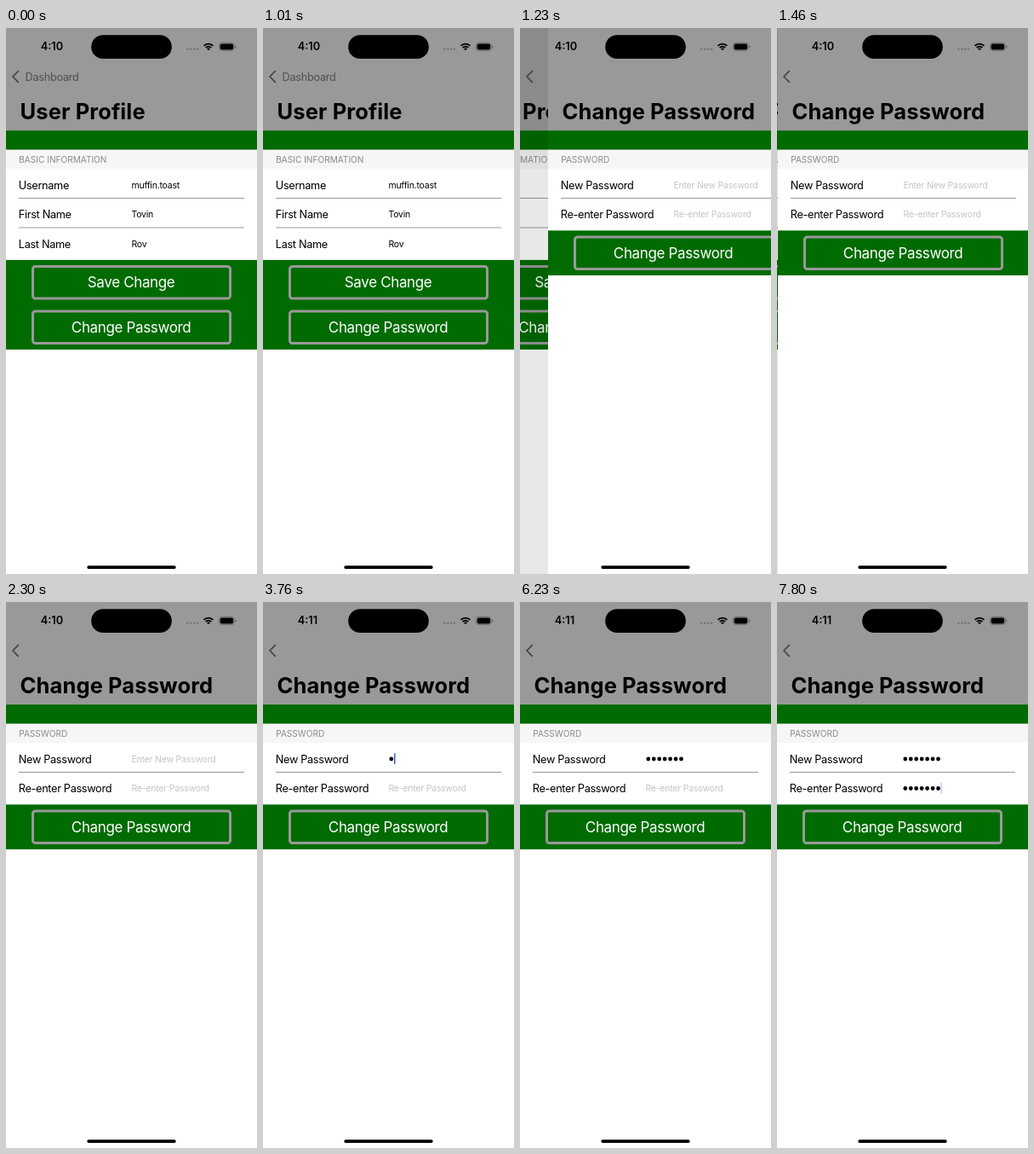
These frames come from a looping animation (295 px wide and 640 px high, 8 s). An HTML page with a canvas:

```html
<!DOCTYPE html>
<html lang="en">
<head>
<meta charset="utf-8">
<title>Change password flow</title>
<style>
  html, body { margin: 0; width: 100%; height: 100%; overflow: hidden; background: #fff; }
  canvas { display: block; width: 295px; height: 640px; }
</style>
</head>
<body>
<canvas id="stage"></canvas>
<script>
const W = 295, H = 640, LOOP = 8000;
const GREEN = '#006b00', GRAY = '#999', CARET = '#3455c8';
const canvas = document.getElementById('stage');
const ctx = canvas.getContext('2d');
const scale = window.devicePixelRatio || 1;
canvas.width = W * scale;
canvas.height = H * scale;

// Each entry: [start ms, number of dots, caret opacity]
const newPassword = [
  [2530, 0, 1], [2950, 0, 0], [3350, 0, 1],
  [3760, 1, 1], [3880, 3, 1], [4010, 4, 1], [4130, 6, 1], [4300, 7, 1],
  [4800, 7, .9], [4920, 7, .3], [5160, 7, 0]
];
const repeatPassword = [
  [5770, 0, .4], [5910, 0, 1], [6230, 0, 0],
  [6670, 1, 1], [6790, 3, 1], [7010, 5, 1], [7170, 7, 1],
  [7680, 7, .9], [7800, 7, .3]
];
const slideTimes = [1010, 1120, 1230, 1340, 1460];

const fieldAt = (steps, t) => steps.findLast(s => s[0] <= t) || [0, 0, 0];

// Critically damped spring, sampled at the slide steps
function slideProgress(t) {
  if (t >= 2300) return 1;
  const at = slideTimes.findLast(s => s <= t);
  if (!at) return 0;
  const x = 17 * (at - 1009) / 1000;
  return 1 - (1 + x) * Math.exp(-x);
}

function rect(x, y, w, h, color) {
  ctx.fillStyle = color;
  ctx.fillRect(x, y, w, h);
}

function pill(x, y, w, h, r, color) {
  ctx.fillStyle = color;
  ctx.beginPath();
  ctx.roundRect(x, y, w, h, r);
  ctx.fill();
}

function dot(x, y, r, color) {
  ctx.fillStyle = color;
  ctx.beginPath();
  ctx.arc(x, y, r, 0, 7);
  ctx.fill();
}

function text(str, x, y, size, { color = '#000', weight = 400, spacing = 0, align = 'left' } = {}) {
  ctx.font = `${weight} ${size}px Inter, Roboto, sans-serif`;
  ctx.letterSpacing = `${spacing * size}px`;
  ctx.textAlign = align;
  ctx.fillStyle = color;
  ctx.fillText(str, x, y);
}

function pageTop(title, section) {
  rect(0, 0, W, H, '#fff');
  rect(0, 0, W, 165, '#f6f6f6');
  rect(0, 0, W, 142.6, GREEN);
  rect(0, 0, W, 120.2, GRAY);
  text(title, 16.6, 106.9, 25.5, { weight: 700, spacing: .004 });
  text(section, 15.2, 157.6, 10.1, { color: '#8a8a8d' });
}

const rowY = i => 184 + 34.5 * i;

function label(str, i) {
  text(str, 14.8, rowY(i) + 4.8, 12.76, { spacing: -.027 });
}

function value(str, i, color) {
  text(str, 147.4, rowY(i) + 3.7, 10.5, { color, spacing: -.02 });
}

function separator(i) {
  rect(15, 199 + 34.5 * i, 265, 1, '#999');
}

function button(str, y, alpha = 1) {
  ctx.strokeStyle = GRAY;
  ctx.lineWidth = 3;
  ctx.beginPath();
  ctx.roundRect(31.5, y + 1.5, 232, 37.5, 3);
  ctx.stroke();
  ctx.globalAlpha = alpha;
  text(str, 147.1, y + 26.2, 17, { color: '#fff', spacing: -.021, align: 'center' });
  ctx.globalAlpha = 1;
}

function profilePage(pressed) {
  pageTop('User Profile', 'BASIC INFORMATION');
  [['Username', 'muffin.toast'], ['First Name', 'Tovin'], ['Last Name', 'Rov']].forEach(([name, val], i) => {
    label(name, i);
    value(val, i, '#000');
    if (i < 2) separator(i);
  });
  rect(0, 271.9, W, 105, GREEN);
  button('Save Change', 278);
  button('Change Password', 330.5, pressed ? .8 : 1);
}

function secureField(i, placeholder, [, count, caret]) {
  const y = rowY(i);
  if (!count) value(placeholder, i, '#c5c5c7');
  for (let n = 0; n < count; n++) dot(150.8 + 6.45 * n, y, 2.4, '#000');
  ctx.globalAlpha = caret;
  rect(147.6 + 6.4 * count, y - 6.7, 1.5, 12.7, CARET);
  ctx.globalAlpha = 1;
}

function passwordPage(t) {
  pageTop('Change Password', 'PASSWORD');
  label('New Password', 0);
  label('Re-enter Password', 1);
  separator(0);
  secureField(0, 'Enter New Password', fieldAt(newPassword, t));
  secureField(1, 'Re-enter Password', fieldAt(repeatPassword, t));
  rect(0, 237.4, W, 52.5, GREEN);
  button('Change Password', 243.5);
}

function backButton(p) {
  ctx.save();
  ctx.beginPath();
  ctx.rect(p ? 11 : 0, 40, W, 40);
  ctx.clip();
  ctx.globalAlpha = Math.max(0, 1 - 1.15 * p);
  text('Dashboard', 22.6 - 78 * p, 61.5, 12.76, { color: '#505050', spacing: -.024 });
  ctx.restore();
  ctx.strokeStyle = '#444';
  ctx.lineWidth = 1.7;
  ctx.lineCap = ctx.lineJoin = 'round';
  ctx.beginPath();
  ctx.moveTo(14.3, 50.7);
  ctx.lineTo(8, 57);
  ctx.lineTo(14.3, 63.3);
  ctx.stroke();
}

function wifi(x, y) {
  const from = -Math.PI * .75, to = -Math.PI * .25;
  ctx.strokeStyle = '#000';
  ctx.lineWidth = 1.9;
  ctx.lineCap = 'butt';
  for (const r of [4.6, 7.7]) {
    ctx.beginPath();
    ctx.arc(x, y, r, from, to);
    ctx.stroke();
  }
  ctx.fillStyle = '#000';
  ctx.beginPath();
  ctx.moveTo(x, y);
  ctx.arc(x, y, 2.7, from, to);
  ctx.fill();
}

function systemChrome(t) {
  text(t < 2530 ? '4:10' : '4:11', 40.8, 26.4, 12.76, { weight: 600 });
  pill(100.2, 8.3, 94.6, 27.8, 13.9, '#000');
  for (let i = 0; i < 4; i++) dot(213.2 + 4 * i, 24.7, 1.3, '#767676');
  wifi(238, 26.3);
  ctx.strokeStyle = '#666';
  ctx.lineWidth = .8;
  ctx.beginPath();
  ctx.roundRect(250.4, 17.4, 18, 9.2, 3);
  ctx.stroke();
  pill(251.6, 18.6, 15.6, 6.8, 1.8, '#000');
  pill(269.3, 20.5, 1.2, 3, .6, '#666');
  pill(95.3, 630.2, 104.4, 3.75, 1.9, '#000');
}

function draw(t) {
  const p = slideProgress(t);
  ctx.setTransform(scale, 0, 0, scale, 0, 0);

  if (p < 1) {
    ctx.save();
    ctx.translate(-.3 * W * p, 0);
    profilePage(t >= 860 && t < 1010);
    ctx.restore();
    rect(0, 0, W, H, `rgba(0,0,0,${.1 * p})`);
  }
  if (p > 0) {
    ctx.save();
    ctx.translate(Math.round(W * (1 - p)), 0);
    passwordPage(t);
    ctx.restore();
  }
  backButton(p);
  systemChrome(t);
}

function frame() {
  draw(performance.now() % LOOP);
  requestAnimationFrame(frame);
}
frame();
</script>
</body>
</html>
```
